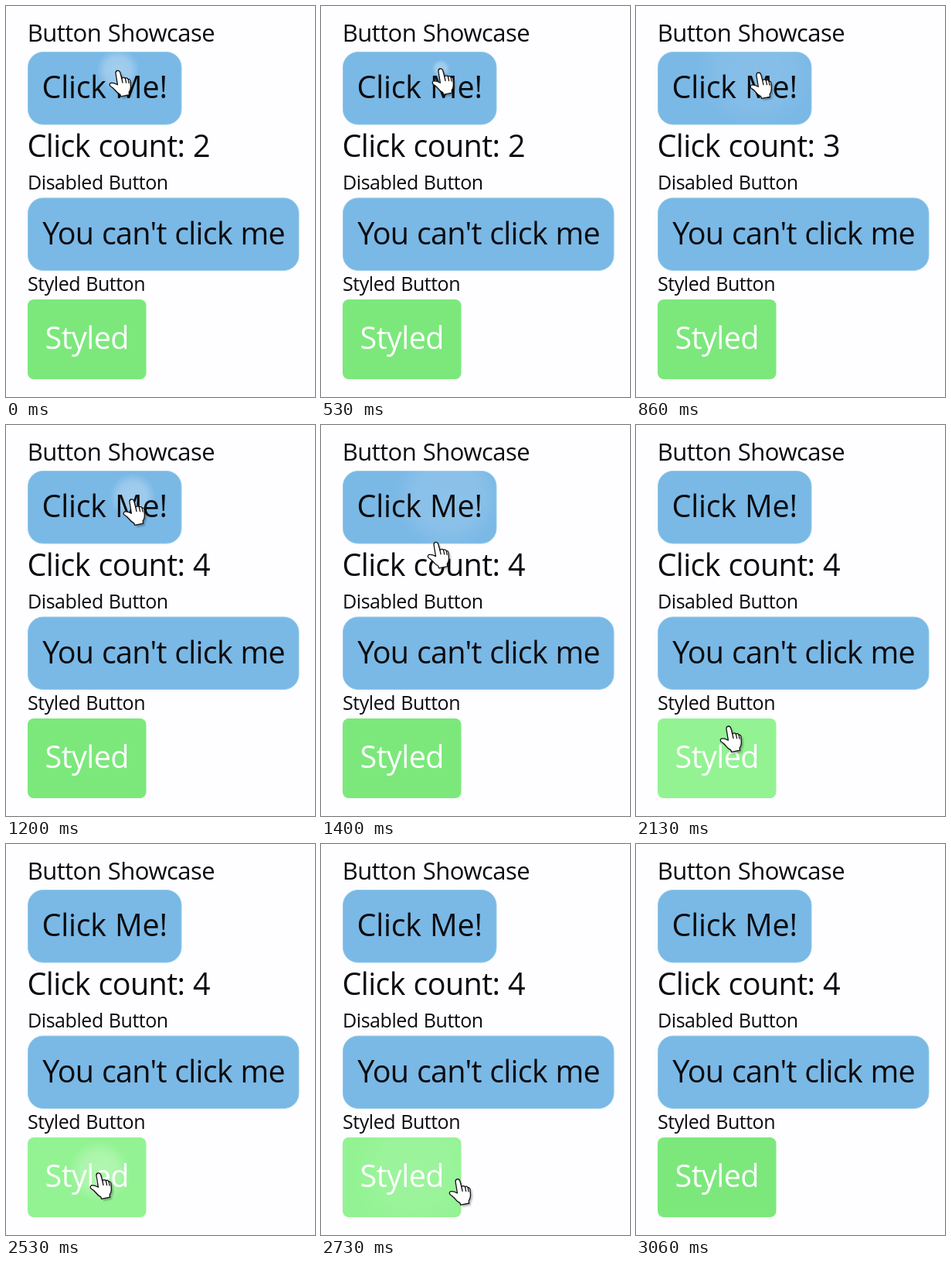
Recreate the animation shown at these times as an HTML page. Size 400x505 px, loop 3.33 s.

```html
<!DOCTYPE html>
<html lang="en">
<head>
<meta charset="utf-8">
<title>Button Showcase</title>
<style>
  html, body { margin: 0; width: 100%; height: 100%; overflow: hidden; background: #fefdff; }
  svg { display: block; width: 400px; height: 505px; }
  text { font-family: "Open Sans", "Noto Sans", sans-serif; fill: #0b0b0d; word-spacing: 1px; }
  .title { font-size: 31px; letter-spacing: -.52px; }
  .label { font-size: 25px; letter-spacing: -.45px; }
  .big { font-size: 39.5px; }
  .mid { text-anchor: middle; }
  .blue { fill: #7ab8e6; stroke: #92cce6; }
  .cursor { fill: #fff; stroke: #111; stroke-linejoin: round; stroke-linecap: round; }
  .shade { fill: #000; stroke: none; opacity: .28; filter: blur(1.3px); }
</style>
</head>
<body>
<svg viewBox="0 0 400 505">
  <defs>
    <radialGradient id="glow">
      <stop offset="0" stop-color="#fff"/>
      <stop offset=".6" stop-color="#fff" stop-opacity=".8"/>
      <stop offset="1" stop-color="#fff" stop-opacity="0"/>
    </radialGradient>
    <clipPath id="inBlue"><rect x="28" y="59" width="199.5" height="94.5" rx="20"/></clipPath>
    <clipPath id="inGreen"><rect x="28" y="379" width="153.5" height="103" rx="8"/></clipPath>
    <path id="handShape" d="M-3 3.5Q-3.3 .6-1 0Q1.8-.4 2.8 2.5L4.8 10Q7.6 7.6 9.4 10Q12 8.4 13.2 11.3Q15.8 10.6 16 14L16.4 21Q16.4 25 14.2 28L14.6 31.2L3.6 33.4L2.8 30.8Q-1 29-4 25Q-7 21.5-10 20Q-11.8 17.5-9.5 16Q-6 15.2-.6 18.2Z"/>
    <path id="arrowShape" d="M0 0V25L6 19.5L10 29L14 27.2L10 18H18Z"/>
  </defs>
  <rect width="400" height="505" fill="#fefdff"/>
  <rect class="blue" x="28.5" y="59.5" width="198.5" height="93.5" rx="19.5"/>
  <rect class="blue" x="28.5" y="248" width="350.5" height="93.5" rx="19.5"/>
  <rect id="green" x="28" y="379" width="153.5" height="103" rx="8"/>
  <g clip-path="url(#inBlue)"><circle id="blueRipple" fill="url(#glow)"/></g>
  <g clip-path="url(#inGreen)"><circle id="greenRipple" fill="url(#glow)"/></g>

  <text class="title" x="27.7" y="46">Button Showcase</text>
  <text class="big mid" x="127.6" y="119" letter-spacing="-.2">Click Me!</text>
  <text class="big" x="27.5" y="195" letter-spacing="-.62">Click count: <tspan id="count">2</tspan></text>
  <text class="label" x="28" y="236.5">Disabled Button</text>
  <text class="big" x="47.3" y="307.5" letter-spacing="-.72">You can't click me</text>
  <text class="label" x="28" y="368">Styled Button</text>
  <text class="big mid" x="104.7" y="443.3" letter-spacing="-.6" style="fill:#fff">Styled</text>

  <g id="hand" class="cursor" stroke-width="1.3">
    <use href="#handShape" class="shade" x="2.5" y="2.5"/>
    <use href="#handShape"/>
    <path d="M4.8 10L6 15.5M9.4 10L10.6 15.5M13.2 11.3L14 16" fill="none"/>
  </g>
  <g id="arrow" class="cursor" stroke-width="1">
    <use href="#arrowShape" class="shade" x="2.5" y="2.5"/>
    <use href="#arrowShape"/>
  </g>
</svg>
<script>
const LOOP = 3330, FPS = 15;
const $ = id => document.getElementById(id);

// pointer path: time, x, y
const path = [
  [0, 145, 83.5], [330, 153, 81], [530, 155, 81], [800, 158, 85], [1070, 164, 92],
  [1200, 163, 96], [1300, 160, 110], [1600, 118, 270], [1730, 114, 295],
  [1850, 114, 310], [2060, 120, 385], [2130, 120, 389], [2190, 120, 393],
  [2260, 120, 425], [2600, 120, 425], [2860, 230, 440], [3000, 362, 450]
];
const bluePresses = [[-115, 145, 83], [500, 155, 81], [1075, 164, 92]];
const greenPresses = [[2360, 121, 423]];
const leaveAt = 3060;

function pointer(t) {
  const i = path.findIndex(p => p[0] > t);
  if (i < 0) return path[path.length - 1].slice(1);
  const [t0, x0, y0] = path[i - 1], [t1, x1, y1] = path[i];
  const u = (t - t0) / (t1 - t0), e = u * u * (3 - 2 * u);
  return [x0 + (x1 - x0) * e, y0 + (y1 - y0) * e];
}

function ripple(el, presses, t) {
  const last = presses.filter(p => p[0] <= t).pop();
  const age = last ? t - last[0] : Infinity;
  const on = age < 430;
  el.setAttribute("r", on ? 5 + age * 0.2 : 0);
  if (!on) return;
  el.setAttribute("cx", last[1]);
  el.setAttribute("cy", last[2]);
  el.setAttribute("opacity", 0.34 * (1 - (age / 430) ** 2));
}

function place(el, x, y, shown) {
  el.setAttribute("transform", `translate(${x} ${y})`);
  el.setAttribute("visibility", shown ? "visible" : "hidden");
}

function draw(time) {
  const t = Math.floor((time % LOOP + 7) * FPS / 1000) * 1000 / FPS;
  const [x, y] = pointer(t);
  const shown = t < leaveAt;
  const overBlue = x < 228 && y > 59 && y < 153;
  const overGreen = shown && x < 182 && y > 379;
  const link = overBlue || overGreen;
  place($("hand"), x, y, shown && link);
  place($("arrow"), x, y, shown && !link);
  $("green").setAttribute("fill", overGreen ? "#93f393" : "#7ce87c");
  $("count").textContent = t < 600 ? 2 : t < 1130 ? 3 : 4;
  ripple($("blueRipple"), bluePresses, t);
  ripple($("greenRipple"), greenPresses, t);
}

const start = performance.now();
function tick() {
  draw(performance.now() - start);
  requestAnimationFrame(tick);
}
tick();
</script>
</body>
</html>
```
